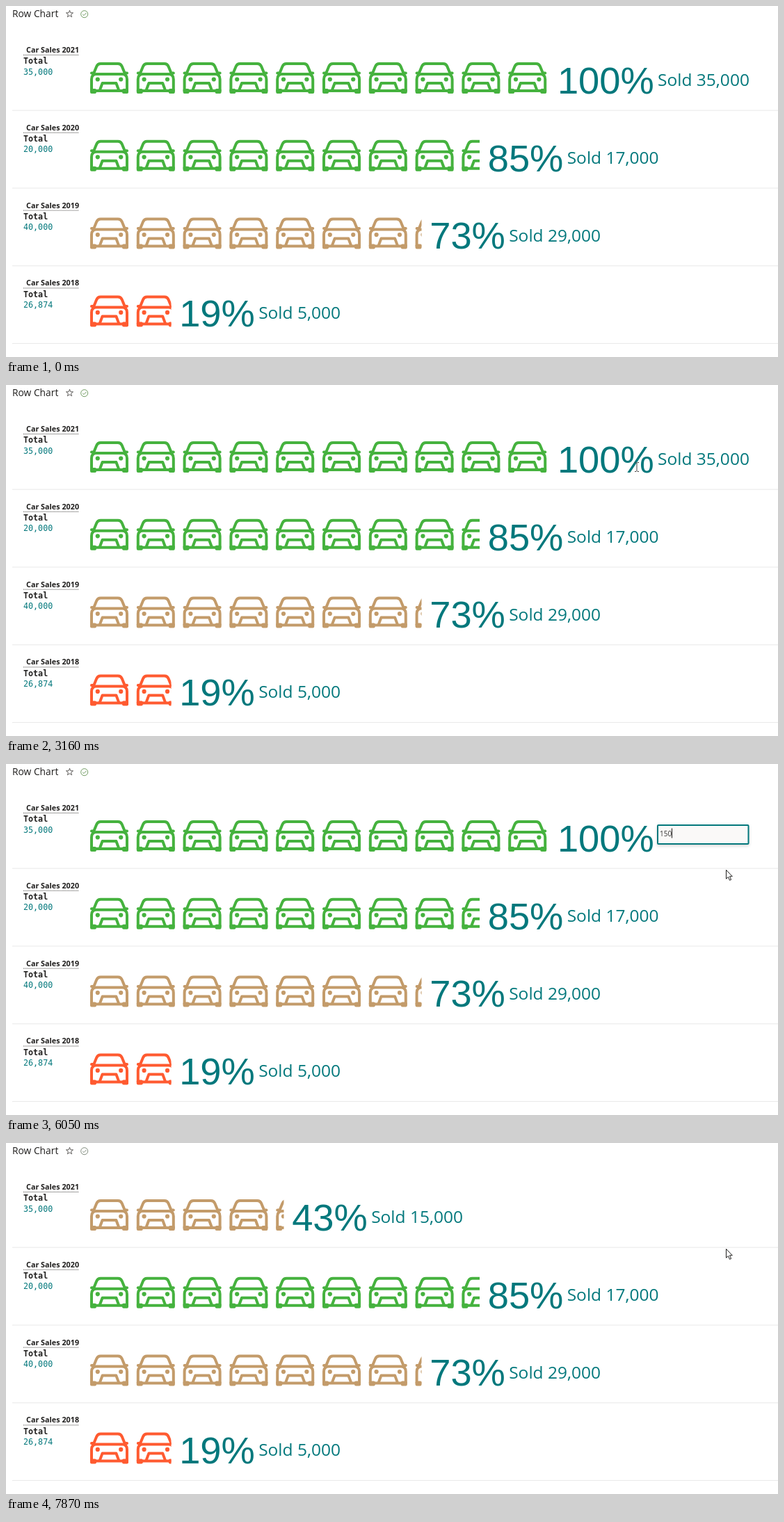
Write an HTML page that moves like this. It is 1110 by 505 pixels and loops after 8000 ms.

```html
<!DOCTYPE html>
<html lang="en">
<head>
<meta charset="utf-8">
<title>Row Chart</title>
<style>
  html, body { margin: 0; width: 100%; height: 100%; overflow: hidden; background: #fff; }
  svg { display: block; font-family: "Open Sans", sans-serif; }
  .head { font-size: 13.8px; font-weight: 500; fill: #201f1e; }
  .title { font-size: 10.8px; font-weight: 700; fill: #201f1e; }
  .mono { font: 11.7px "DejaVu Sans Mono", monospace; fill: #03787c; }
  .total { font-weight: 700; fill: #201f1e; }
  .pct { font: 54.3px "Liberation Sans", Arial, sans-serif; fill: #03787c; }
  .sold { font-size: 24.5px; fill: #03787c; }
  .edit { font-size: 10px; fill: #323130; }
  .saving { font-size: 9.1px; fill: #03787c; }
  .box { stroke: #03787c; stroke-width: 2; filter: drop-shadow(0 2px 2px rgba(0, 0, 0, .16)); }
  .line { fill: none; stroke-width: 1; }
</style>
</head>
<body>
<svg width="1110" height="505" viewBox="0 0 1110 505">
  <defs>
    <g id="car">
      <g fill="none" stroke="currentColor" stroke-width="4" stroke-linejoin="round">
        <path d="M4.5 17.5 9.2 6Q10.8 2 15 2H40Q44.2 2 45.8 6L50.5 17.5"/>
        <path d="M2 41V24.5Q2 17 9 17H46Q53 17 53 24.5V41Z"/>
        <path d="M13.5 41 17.6 30H37.4L41.5 41"/>
      </g>
      <g fill="currentColor">
        <circle cx="10.8" cy="24.5" r="3.1"/>
        <circle cx="44.2" cy="24.5" r="3.1"/>
        <rect y="38" width="9" height="7" rx="2"/>
        <rect x="46" y="38" width="9" height="7" rx="2"/>
        <rect y="13.5" width="6" height="4" rx="2"/>
        <rect x="49" y="13.5" width="6" height="4" rx="2"/>
      </g>
    </g>
  </defs>

  <text class="head" x="9" y="16">Row Chart</text>
  <path id="star" class="line" stroke="#605e5c"/>
  <g id="check" class="line">
    <circle cx="112.7" cy="11.7" r="5"/>
    <path d="M110.2 11.8 112 13.6 115.4 10"/>
  </g>
  <g id="sync" class="line" stroke="#7a7876">
    <circle cx="112.7" cy="11.7" r="5"/>
    <path d="M110 11A2.9 2.9 0 0 1 115.2 10.2V8.6M115.4 12.4A2.9 2.9 0 0 1 110.2 13.2V14.8"/>
  </g>
  <g id="rows"></g>
  <path id="caret" class="line" stroke="#201f1e" d="M29.5 167V182"/>

  <g id="loading">
    <rect class="box" x="937" y="88" width="130.5" height="35" rx="1" fill="#fff"/>
    <circle class="line" cx="1002" cy="105" r="7.5" stroke="#d5e6e6"/>
    <path id="spin" class="line" stroke="#03787c" d="M1002 97.5A7.5 7.5 0 0 1 1008.5 101.2"/>
  </g>

  <g id="editor">
    <rect class="box" x="937" y="88" width="130.5" height="27" rx="1" fill="#faf9f8"/>
    <rect id="select" x="940" y="92.5" width="28.6" height="14" fill="#0078d7"/>
    <text id="input" class="edit" x="940" y="103.6"></text>
    <path id="typing" class="line" stroke="#201f1e" d="M.5 92.5V106.5"/>
  </g>

  <g id="saving">
    <rect class="box" x="937" y="88" width="130.5" height="40" rx="1" fill="#fff"/>
    <svg x="937.5" y="89" width="129" height="38" viewBox="937.5 89 129 38">
      <text class="edit" x="936" y="103.6">15000</text>
      <circle class="line" cx="941.5" cy="122.5" r="4.5" stroke="#c4dfe0"/>
      <path id="spinSmall" class="line" stroke="#03787c" d="M941.5 118A4.5 4.5 0 0 1 946 122.5"/>
      <text class="saving" x="949" y="126">Saving...</text>
    </svg>
  </g>

  <path id="arrow" fill="#fff" stroke="#201f1e" stroke-linejoin="round"
        d="M.5 .5V13.2L3.4 10.5 5.5 15.3 7.6 14.4 5.5 9.7H9.3Z"/>
  <path id="beam" class="line" stroke="#484644" d="M-3 -6.5H-1L0 -5.5 1 -6.5H3M0 -5.5V5.5M-3 6.5H-1L0 5.5 1 6.5H3"/>
</svg>

<script>
const $ = id => document.getElementById(id);
const GREEN = '#45b23e', TAN = '#c39b6a', RED = '#ff5a30';
const LEFT = 113.2, STEP = 66.8, PITCH = 111.8, PCT_SIZE = 54.3;

const star = Array.from({ length: 10 }, (_, i) => {
  const r = i % 2 ? 2.2 : 5.3, a = i * Math.PI / 5;
  return `${91.5 + r * Math.sin(a)} ${11.5 - r * Math.cos(a)}`;
});
$('star').setAttribute('d', `M${star.join('L')}Z`);

const fmt = n => n.toLocaleString('en-US');

function bar(id, row, sold, total, color) {
  const share = sold / total, y = PITCH * row;
  const pct = Math.round(share * 100) + '%';
  const end = LEFT + STEP * 10 * share, px = end + 11.7;
  const soldX = px + PCT_SIZE * (0.556 * (pct.length - 1) + 0.889) + 5.3;
  let cars = '';
  for (let i = 0; i < Math.ceil(share * 10); i++)
    cars += `<use href="#car" x="${121 + STEP * i}" y="${81 + y}"/>`;
  return `<g id="${id}">
    <clipPath id="${id}Clip"><rect x="${LEFT}" y="${y + 75}" width="${end - LEFT}" height="60"/></clipPath>
    <g clip-path="url(#${id}Clip)" color="${color}">${cars}</g>
    <text class="pct" x="${px}" y="${125.7 + y}">${pct}</text>
    <text class="sold" x="${soldX}" y="${115 + y}">Sold ${fmt(sold)}</text></g>`;
}

function label(row, year, total) {
  const y = PITCH * row;
  return `<text class="title" x="29" y="${67 + y}">Car Sales ${year}</text>
    <path class="line" stroke="#484644" stroke-dasharray="1 1" d="M25 ${70.5 + y}H105"/>
    <text class="mono total" x="25" y="${83.4 + y}">Total</text>
    <text class="mono" x="25" y="${98.6 + y}">${fmt(total)}</text>
    <path class="line" stroke="#e8e8e8" d="M9 ${150.2 + y}H1110"/>`;
}

const data = [
  [2021, 35000, 35000, GREEN], [2020, 17000, 20000, GREEN],
  [2019, 29000, 40000, TAN], [2018, 5000, 26874, RED]
];
$('rows').innerHTML = data.map(([year, sold, total, color], i) =>
  label(i, year, total) + bar('bar' + i, i, sold, total, color)).join('') +
  bar('edited', 0, 15000, 35000, TAN);

// time, x, y of the pointer
const path = [
  [510, 1046, 469], [1260, 187, 177], [1400, 138, 177], [1600, 84, 128], [1820, 114, 101],
  [1890, 114, 101], [2220, 29, 93], [2890, 29, 93], [3160, 907, 118], [3620, 1033, 110],
  [3780, 1035, 112], [3980, 1035, 130], [4180, 1035, 130], [4440, 1035, 152]
];
// time, content of the input
const typed = [[4520, '35000'], [5450, '1'], [5580, '15'], [6050, '150'], [6180, '1500'], [6380, '15000']];

const ease = u => u * u * (3 - 2 * u);
const show = (id, on) => { $(id).style.display = on ? '' : 'none'; };
const move = (id, x, y) => $(id).setAttribute('transform', `translate(${x} ${y})`);
const turn = (id, a, x, y) => $(id).setAttribute('transform', `rotate(${a} ${x} ${y})`);

function pointerAt(t) {
  const i = path.findIndex(p => p[0] > t);
  if (i < 0) return path[path.length - 1].slice(1);
  if (i === 0) return path[0].slice(1);
  const [t0, x0, y0] = path[i - 1], [t1, x1, y1] = path[i];
  const u = ease((t - t0) / (t1 - t0));
  return [Math.round(x0 + (x1 - x0) * u), Math.round(y0 + (y1 - y0) * u)];
}

// cubic-bezier(.1, .9, .2, 1)
function slide(u) {
  if (u <= 0) return 0;
  if (u >= 1) return 1;
  let lo = 0, hi = 1, s;
  for (let i = 0; i < 20; i++) {
    s = (lo + hi) / 2;
    const x = 0.3 * (1 - s) ** 2 * s + 0.6 * (1 - s) * s * s + s ** 3;
    if (x < u) lo = s; else hi = s;
  }
  return 2.7 * (1 - s) ** 2 * s + 3 * (1 - s) * s * s + s ** 3;
}

function draw(t) {
  const beat = 3160 + Math.floor((t - 3160) / 67.8) * 67.8;
  const within = (a, b) => t >= a && t < b;

  const [x, y] = pointerAt(beat);
  const onText = x < 70 || (x > 790 && beat > 2900 && t < 3780);
  show('arrow', t >= 510 && !onText);
  show('beam', t >= 510 && onText);
  move('arrow', x, y);
  move('beam', x, y);

  show('caret', within(3780, 4590));
  show('loading', within(4080, 4520));
  const p = slide((beat - 4080) / 367);
  move('loading', 0, 20 * (1 - p));
  $('loading').style.opacity = p;
  turn('spin', beat * 0.28, 1002, 105);

  show('editor', within(4520, 6710));
  const entry = typed.filter(e => e[0] <= t).pop();
  const text = entry ? entry[1] : '';
  const selected = within(4590, 5450);
  $('input').textContent = text;
  $('input').style.fill = selected ? '#fff' : '';
  show('select', selected);
  show('typing', t >= 5450);
  move('typing', Math.round(940 + text.length * 5.72), 0);

  show('saving', within(6710, 7270));
  turn('spinSmall', beat * 0.28, 941.5, 122.5);
  show('sync', within(6710, 7870));
  show('check', !within(6710, 7870));
  $('check').style.stroke = t < 7870 ? '#6f9a60' : '#7f8a7c';

  show('bar0', t < 7270);
  show('edited', t >= 7270);
  const editing = within(4080, 7270);
  $('bar0').querySelector('.sold').style.display = editing ? 'none' : '';
}

const start = performance.now();
function loop() {
  draw((performance.now() - start) % 8000);
  requestAnimationFrame(loop);
}
loop();
</script>
</body>
</html>
```
